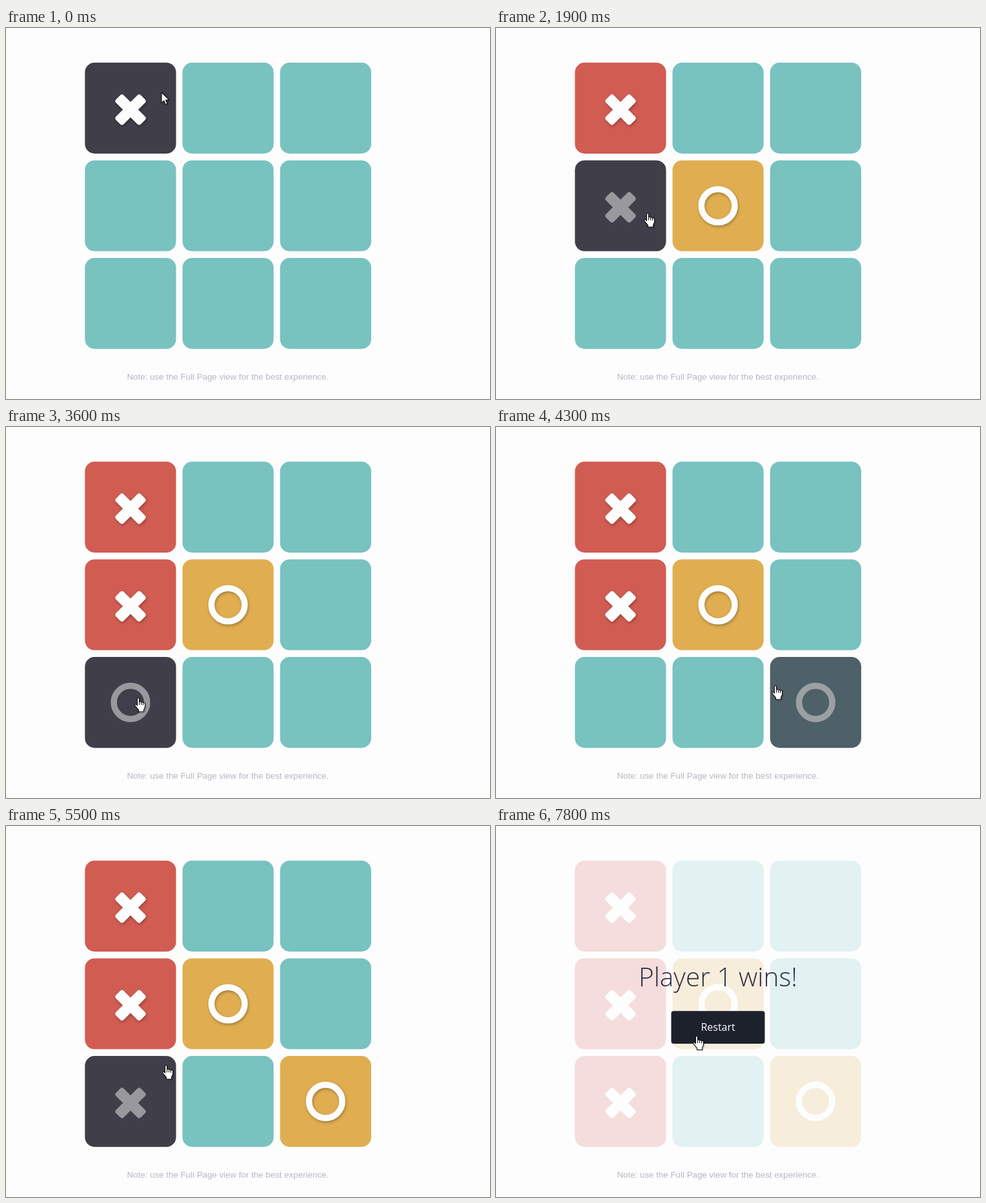
These frames come from a looping animation (750x576 px, 8 s). An HTML page:

```html
<!DOCTYPE html>
<html lang="en">
<head>
<meta charset="utf-8">
<title>Tic-tac-toe</title>
<style>
  html, body { margin: 0; width: 100%; height: 100%; overflow: hidden; background: #fdfdfe; }
  svg { display: block; width: 750px; height: 576px; }
  text { text-anchor: middle; }
  .note { font: 13.333px Arial, "Liberation Sans", sans-serif; fill: #bab5c2; }
  .title { font: 300 40.5px "Open Sans", sans-serif; fill: #2d3042; }
  .label { font: 16px "Open Sans", sans-serif; fill: #fdfdfe; }
</style>
</head>
<body>
<svg viewBox="0 0 750 576" xmlns="http://www.w3.org/2000/svg">
  <rect width="750" height="576" fill="#fdfdfe"/>
  <g id="board"></g>
  <text class="note" x="343.8" y="546">Note: use the Full Page view for the best experience.</text>
  <g id="result">
    <text class="title" x="344" y="248.5">Player 1 wins!</text>
    <rect x="271.5" y="287.3" width="145" height="50.7" rx="4" fill="#1d212c"/>
    <text class="label" x="344" y="318">Restart</text>
  </g>
  <g id="cursor" stroke="#111" stroke-width="1.1" fill="#fff" stroke-linejoin="round"
     style="filter:drop-shadow(1px 1px 1px rgba(0,0,0,.25))">
    <path id="arrow" d="M0 0V16.2L3.7 12.8L6.3 18.6L9 17.4L6.4 11.7H11.6Z"/>
    <g id="hand" transform="translate(-6 -1)">
      <path d="M4.5 1.7C4.5 .2 7.5 .2 7.5 1.7V7C8 6.2 10.3 6.3 10.5 7.4C11 6.8 13.2 7 13.4 8.2C14 7.7 16.4 8 16.5 9.5V14.5L14.6 18.8V22H6.5V19.3L1 12.7C0 11 1.8 9.8 3 10.8L4.5 12.3Z"/>
      <path d="M7.5 7V11.5M10.5 7.5V11.5M13.4 8.3V12" fill="none"/>
    </g>
  </g>
</svg>
<script>
const LOOP = 8000, STEP = 100;
const NS = "http://www.w3.org/2000/svg";
const $ = id => document.getElementById(id);

const FREE = [120, 194, 192], DARK = [63, 62, 73], WHITE = [253, 253, 254];
const FAINT = [153, 152, 157], FAINT_LIGHT = [160, 182, 184];
const CLAIMED = { X: [209, 92, 82], O: [224, 174, 80] };
const VEIL = 0.8;

// cell, pointer enters, pointer leaves, mark, click time
const VISITS = [
  [0, -1000, 200, "X", 0],
  [4, 300, 1500, "O", 1000],
  [3, 1600, 2800, "X", 2300],
  [6, 2900, 3900, "O", Infinity],
  [7, 3900, 4100, "O", Infinity],
  [8, 4100, 5000, "O", 4600],
  [7, 5000, 5200, "X", Infinity],
  [6, 5200, 5900, "X", 5800]
];

// time, x, y of the pointer tip
const PATH = [
  [0, 241, 100], [100, 243, 106], [300, 300, 210], [600, 396, 296],
  [1000, 385, 300], [1300, 372, 298], [1600, 262, 292], [1900, 235, 288],
  [2300, 230, 290], [2600, 222, 318], [3000, 212, 375], [3600, 205, 421],
  [3800, 225, 420], [4100, 428, 404], [4300, 433, 402], [4600, 470, 420],
  [4900, 462, 418], [5200, 250, 385], [5500, 248, 372], [6400, 247, 373],
  [7200, 330, 440], [7400, 345, 425], [7600, 345, 425], [7800, 311, 326.5],
  [LOOP, 311, 326.5]
];

const clamp = v => Math.max(0, Math.min(1, v));
const ease = v => { v = clamp(v); return v * v * (3 - 2 * v); };
const mix = (a, b, k) => a.map((v, i) => v + (b[i] - v) * k);
const rgb = c => `rgb(${c.map(Math.round).join()})`;

function add(parent, tag, attrs) {
  const el = document.createElementNS(NS, tag);
  for (const key in attrs) el.setAttribute(key, attrs[key]);
  return parent.appendChild(el);
}

function makeCell(i) {
  const x = 122.3 + (i % 3) * 151.2, y = 53.8 + Math.floor(i / 3) * 151.6;
  const g = add($("board"), "g", { transform: `translate(${x} ${y})` });
  const tile = add(g, "rect", { width: 141.2, height: 141.2, rx: 15 });
  const X = add(g, "g", { transform: "translate(70.7 73)" });
  for (const angle of [45, -45])
    add(X, "rect", { x: -27.2, y: -8.4, width: 54.4, height: 16.8, rx: 4, transform: `rotate(${angle})` });
  const O = add(g, "circle", { cx: 70.6, cy: 70.6, r: 25.8, fill: "none", "stroke-width": 9.6 });
  return { tile, X, O };
}
const cells = Array.from({ length: 9 }, (_, i) => makeCell(i));

function hoverLevel([, enter, leave], t) {
  const rise = ease((Math.min(t, leave) - enter) / 300);
  return t < leave ? rise : rise * (1 - ease((t - leave) / 200));
}

function drawCell(cell, i, t, veil) {
  const visit = VISITS.filter(v => v[0] === i && t >= v[1]).pop();
  const over = visit && t < visit[2];
  const taken = visit && t >= visit[4];
  const mark = visit && (over || taken) ? visit[3] : null;
  const level = visit ? hoverLevel(visit, t) : 0;

  const base = mix(taken ? CLAIMED[mark] : FREE, DARK, level);
  cell.tile.setAttribute("fill", rgb(mix(base, WHITE, veil * VEIL)));

  const color = rgb(taken ? WHITE : mix(FAINT_LIGHT, FAINT, level));
  cell.X.setAttribute("fill", color);
  cell.O.setAttribute("stroke", color);
  for (const name of ["X", "O"]) {
    cell[name].style.display = mark === name ? "" : "none";
    cell[name].style.filter = taken && veil < 1
      ? `drop-shadow(1px 2px 2px rgba(0,0,0,${0.3 * (1 - veil)}))` : "none";
  }
  return over && !taken;
}

function pointerAt(t) {
  const n = PATH.findIndex(p => p[0] > t);
  const a = PATH[n - 1], b = PATH[n];
  const k = ease((t - a[0]) / (b[0] - a[0]));
  return mix(a, b, k).slice(1);
}

function draw(t) {
  const veil = ease((t - 5800) / 500);
  const clickable = cells.map((cell, i) => drawCell(cell, i, t, veil)).some(Boolean);
  $("result").setAttribute("opacity", ease((t - 5800) / 700));

  const [x, y] = pointerAt(t);
  const onButton = veil > 0 && x > 271 && x < 417 && y > 287 && y < 338;
  const hand = clickable || onButton;
  $("cursor").setAttribute("transform", `translate(${x.toFixed(1)} ${y.toFixed(1)})`);
  $("hand").style.display = hand ? "" : "none";
  $("arrow").style.display = hand ? "none" : "";
}

const start = performance.now();
function tick() {
  const t = (performance.now() - start) % LOOP;
  draw(Math.floor(t / STEP) * STEP);
  requestAnimationFrame(tick);
}
tick();
</script>
</body>
</html>
```
